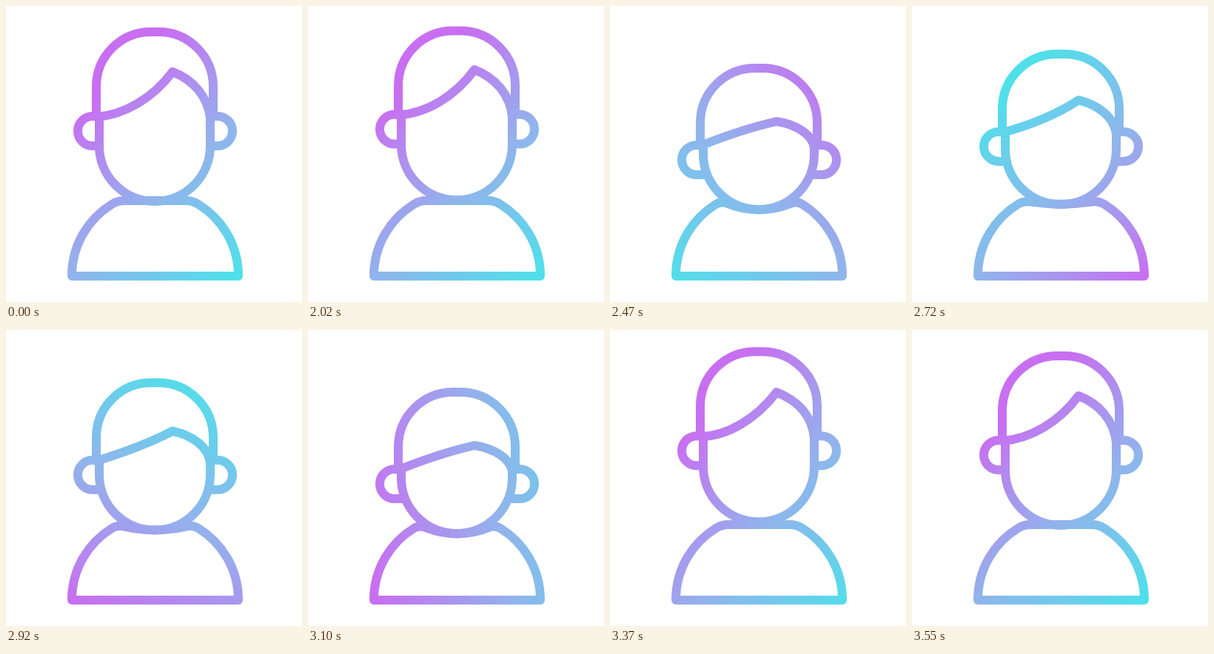
Write an HTML page that moves like this. It is 400x400 px and loops after 3570 ms.

```html
<!DOCTYPE html>
<html lang="en">
<head>
<meta charset="utf-8">
<title>Nodding avatar</title>
<style>
  html, body { margin: 0; height: 100%; overflow: hidden; background: #fff; }
  svg { display: block; width: 100vw; height: 100vh; }
  path { fill: none; stroke: url(#tint); stroke-width: 12; stroke-linecap: round; stroke-linejoin: round; }
</style>
</head>
<body>
<svg viewBox="0 0 400 400">
  <defs>
    <linearGradient id="tint" gradientUnits="userSpaceOnUse">
      <stop offset="0" stop-color="#c86ff1"/>
      <stop offset=".5" stop-color="#91b4ec"/>
      <stop offset="1" stop-color="#4fe0ea"/>
    </linearGradient>
  </defs>
  <path id="body"/>
  <path id="ears"/>
  <path id="face"/>
  <path id="hair"/>
</svg>
<script>
const LOOP = 3570, START = 2020, END = 3550;
const $ = id => document.getElementById(id);
const sine = u => (1 - Math.cos(Math.PI * u)) / 2;

// Eased value at time t through [time, value] keys
function track(t, keys) {
  const i = keys.findIndex(k => k[0] > t);
  if (i === 0) return keys[0][1];
  if (i < 0) return keys[keys.length - 1][1];
  const [t0, a] = keys[i - 1], [t1, b] = keys[i];
  return a + (b - a) * sine((t - t0) / (t1 - t0));
}

// Lift, drop, half rise, drop, spring back
const nod = (t, lift, low, mid, spring, springTime = 3345) => t < START ? 0 : track(t, [
  [1960, 0], [2110, lift], [2470, low], [2785, mid], [3100, low], [springTime, spring], [END, 0]
]);

function drawFigure(t) {
  const top = 35 + nod(t, -4, 49, 28, -6, 3380);
  const earShift = nod(t, -7, 39, 19, -6);
  const ear = 149 + earShift;
  const peakShift = nod(t, -8, 67, 35, -5);
  const peak = 89 + peakShift;
  const chinShift = nod(t, -5, 11, 3.4, -5);
  const chin = 264 + chinShift;
  const dip = Math.max(0, chinShift);
  const neck = 263 + .4 * dip, cap = top + 74, jaw = chin - 75;

  $('body').setAttribute('d', `M89 365C89 322 112 287 143 268Q151 263 160 ${neck}
    Q201.5 ${263 + 1.85 * dip} 243 ${neck}Q252 263 260 268C291 287 314 322 314 365Z`);
  $('ears').setAttribute('d', `M122 ${ear}H117a20 20 0 0 0 0 40H${126 + earShift / 10}
    M280 ${ear}H286a20 20 0 0 1 0 40H${277 - earShift / 10}`);
  $('face').setAttribute('d', `M126 ${ear + 1}V${jaw}A75 75 0 0 0 276 ${jaw}V${ear + 3}`);
  $('hair').setAttribute('d', `M276 ${ear + 3}
    C273 ${122 + 1.33 * earShift} 252 ${99 + .91 * peakShift} 225 ${peak}
    C198 ${125 + .95 * earShift} 160 ${147 + .69 * earShift} 122 ${ear + 1}
    V${cap}C122 ${top + 33} 155 ${top} 196 ${top}H206C247 ${top} 280 ${top + 33} 280 ${cap}V${ear}`);
}

function turnGradient(t) {
  const u = Math.min(1, Math.max(0, (t - START) / (END - START)));
  const angle = (47 + 360 * sine(u + .16 * u * (1 - u))) * Math.PI / 180;
  const half = track(t, [[START, 307], [2470, 361], [2720, 315], [3100, 368], [3250, 326], [END, 307]]) / 2;
  const cx = track(t, [[START, 213], [2470, 207], [2720, 213], [3100, 260], [3250, 230], [END, 213]]);
  const cy = 248, dx = half * Math.cos(angle), dy = half * Math.sin(angle);
  const ends = { x1: cx - dx, y1: cy - dy, x2: cx + dx, y2: cy + dy };
  for (const name in ends) $('tint').setAttribute(name, ends[name]);
}

function render() {
  const t = performance.now() % LOOP;
  drawFigure(t);
  turnGradient(t);
  requestAnimationFrame(render);
}
render();
</script>
</body>
</html>
```
